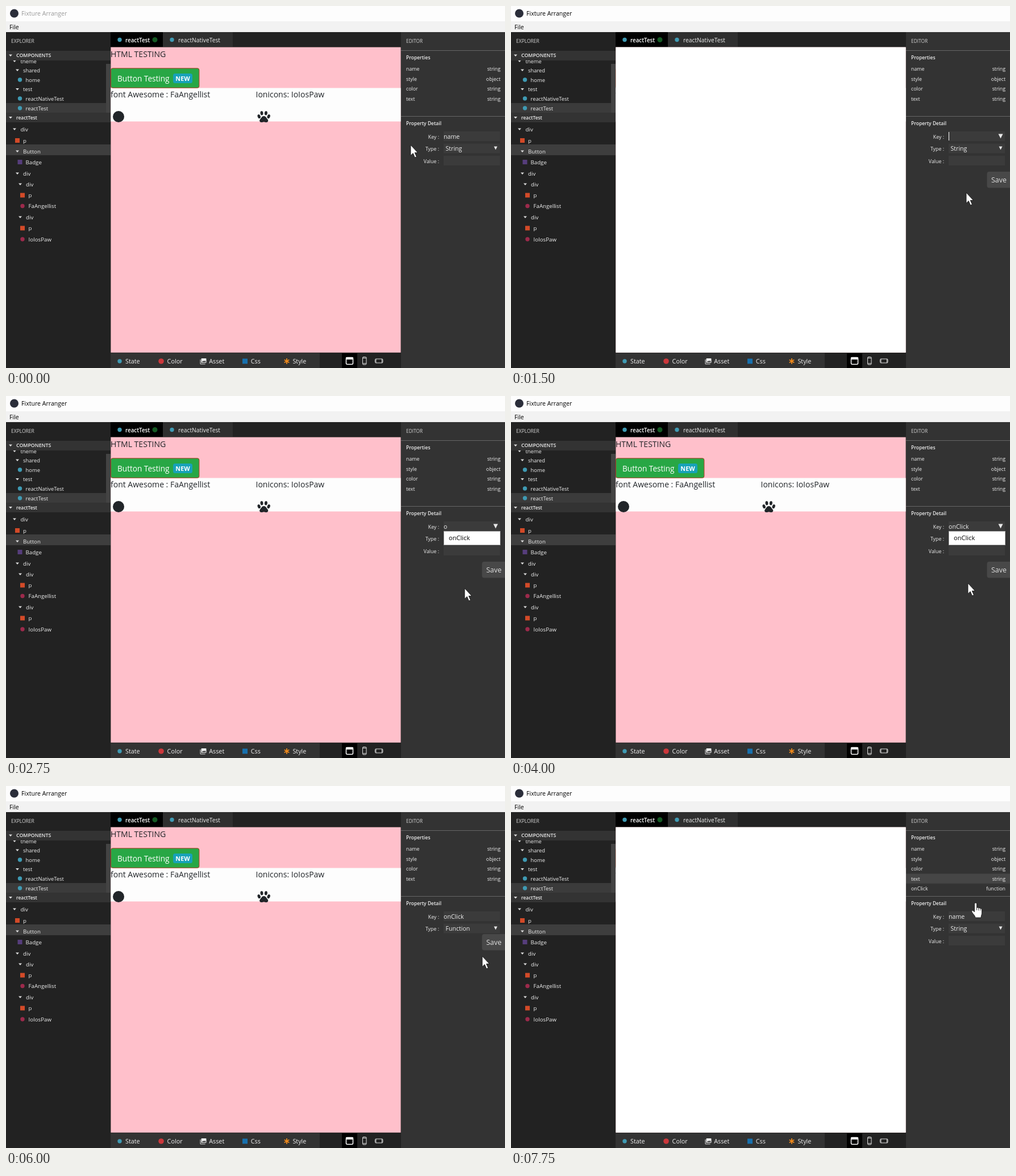
Recreate the animation shown at these times as an HTML page. Size 878 by 638 pixels, loop 8000 ms.

```html
<!DOCTYPE html>
<html lang="en">
<head>
<meta charset="utf-8">
<title>Component editor</title>
<style>
  html, body { margin: 0; width: 100%; height: 100%; overflow: hidden; background: #222; }
  svg { display: block; width: 878px; height: 638px; font-family: "Open Sans", "Noto Sans", sans-serif; }
  text { white-space: pre; }
  .anim { animation: 8s step-end infinite; }

  #title { animation-name: focus; }
  #flash { animation-name: flash; }
  #keyName { animation-name: key-name; }
  #caret { animation-name: caret; }
  #keyArrow { animation-name: key-arrow; }
  #typed1 { animation-name: typed1; }
  #typed2 { animation-name: typed2; }
  #typed3 { animation-name: typed3; }
  #list { animation-name: list; }
  #asString { animation-name: as-string; }
  #asFunction { animation-name: as-function; }
  #save { animation-name: save; }
  #newRow { animation-name: new-row; }
  #hover { animation-name: hover; }
  #pointer { animation-name: pointer; }
  #arrow { animation-name: arrow; }
  #hand { animation-name: hand; }

  @keyframes focus { 0% { fill: #999 } 3.125%, 100% { fill: #000 } }
  @keyframes flash {
    0%, 21.875%, 84.375% { opacity: 0 }
    18.75%, 81.25%, 96.875%, 100% { opacity: 1 }
  }
  @keyframes key-name { 0%, 96.875%, 100% { opacity: 1 } 18.75% { opacity: 0 } }
  @keyframes caret { 0%, 34.375%, 100% { opacity: 0 } 18.75% { opacity: 1 } }
  @keyframes key-arrow { 0%, 59.375%, 100% { opacity: 0 } 18.75% { opacity: 1 } }
  @keyframes typed1 { 0%, 37.5%, 100% { opacity: 0 } 34.375% { opacity: 1 } }
  @keyframes typed2 { 0%, 43.75%, 100% { opacity: 0 } 37.5% { opacity: 1 } }
  @keyframes typed3 { 0%, 81.25%, 100% { opacity: 0 } 43.75% { opacity: 1 } }
  @keyframes list { 0%, 56.25%, 100% { opacity: 0 } 34.375% { opacity: 1 } }
  @keyframes as-string { 0%, 81.25%, 100% { opacity: 1 } 68.75% { opacity: 0 } }
  @keyframes as-function { 0%, 81.25%, 100% { opacity: 0 } 68.75% { opacity: 1 } }
  @keyframes save {
    0%, 81.25%, 100% { opacity: 0; transform: none }
    18.75% { opacity: 1; transform: none }
    68.75% { opacity: 1; transform: translateY(-31px) }
  }
  @keyframes new-row { 0% { opacity: 0 } 81.25%, 100% { opacity: 1 } }
  @keyframes hover {
    0% { opacity: 0; transform: none }
    87.5%, 96.875%, 100% { opacity: 1; transform: translateY(52.5px) }
    90.625% { opacity: 1; transform: translateY(17.5px) }
    93.75% { opacity: 1; transform: none }
  }
  @keyframes arrow { 0% { opacity: 1 } 87.5%, 100% { opacity: 0 } }
  @keyframes hand { 0% { opacity: 0 } 87.5%, 100% { opacity: 1 } }
  @keyframes pointer {
    0% { transform: translate(712px, 245px) }
    3.125% { transform: translate(720px, 244px) }
    6.25% { transform: translate(760px, 238px) }
    9.375% { transform: translate(805px, 231px) }
    12.5% { transform: translate(830px, 226px) }
    15.625% { transform: translate(833px, 228px) }
    18.75% { transform: translate(801px, 329px) }
    21.875% { transform: translate(805px, 335px) }
    25% { transform: translate(807px, 339px) }
    50% { transform: translate(804px, 330px) }
    53.125% { transform: translate(806px, 268px) }
    56.25% { transform: translate(815px, 249px) }
    59.375% { transform: translate(845px, 247px) }
    62.5% { transform: translate(861px, 249px) }
    65.625% { transform: translate(842px, 290px) }
    68.75% { transform: translate(816px, 337px) }
    71.875% { transform: translate(824px, 322px) }
    75% { transform: translate(838px, 300px) }
    78.125% { transform: translate(851px, 276px) }
    84.375% { transform: translate(845px, 240px) }
    87.5% { transform: translate(832px, 168px) }
    90.625% { transform: translate(818px, 127px) }
    93.75% { transform: translate(815px, 110px) }
    96.875%, 100% { transform: translate(818px, 206px) }
  }
</style>
</head>
<body>
<svg id="stage" viewBox="0 0 878 638"></svg>
<script>
const light = '#efefef', ink = '#212529', panel = '#333';
const blue = '#3f9ab3', orange = '#d24a28', crimson = '#9c2a4b', purple = '#563d7c';

const rect = (x, y, w, h, fill, more = '') =>
  `<rect x="${x}" y="${y}" width="${w}" height="${h}" fill="${fill}" ${more}/>`;
const text = (x, y, str, size, fill = light, more = '') =>
  `<text x="${x}" y="${y}" font-size="${size}" fill="${fill}" ${more}>${str}</text>`;
const dot = (x, y, fill, r = 3.7) => `<circle cx="${x}" cy="${y}" r="${r}" fill="${fill}"/>`;
const box = (x, y, fill, s = 8) => rect(x - s / 2, y - s / 2, s, s, fill);
const chevron = (x, y) => `<path d="M${x - 3} ${y - 1.5}h6l-3 3.5z" fill="#ddd"/>`;
const dropArrow = (y, s) => `<path d="M${861.5 - s / 2} ${y - s / 2}h${s}l${-s / 2} ${s}z" fill="#e8e8e8"/>`;
const anim = (id, content) => `<g id="${id}" class="anim">${content}</g>`;
const bold = 'font-weight="600"', end = 'text-anchor="end"';

const marks = {
  open: chevron,
  comp: (x, y) => dot(x, y, blue),
  html: (x, y) => box(x, y, orange),
  badge: (x, y) => box(x, y, purple),
  icon: (x, y) => dot(x, y, crimson)
};
const treeItem = size => ([mark, x, y, label, labelX]) =>
  marks[mark](x, y) + text(labelX, y + 3.5, label, size);

const titleBar = () =>
  rect(0, 0, 878, 27, '#fdfdfd') + rect(0, 27, 878, 19, '#f2f2f2') +
  dot(14.5, 13, '#2b2e3a', 7.5) +
  '<text id="title" class="anim" x="27" y="17" font-size="10.6">Fixture Arranger</text>' +
  text(6, 40.5, 'File', 10.6, '#000');

const explorer = () =>
  rect(0, 46, 184, 592, '#222') + text(9, 65.3, 'EXPLORER', 8.5, '#d6d6d6') +
  rect(0, 171, 184, 17, '#3b3b3b') + rect(176, 102, 8, 86, '#434343') +
  [
    ['open', 15, 97, 'theme', 25.5],
    ['open', 20, 113, 'shared', 30],
    ['comp', 24.5, 130, 'home', 34.5],
    ['open', 20, 146.5, 'test', 30],
    ['comp', 24.5, 163, 'reactNativeTest', 34.5],
    ['comp', 24.5, 180, 'reactTest', 34.5]
  ].map(treeItem(9.4)).join('') +
  rect(0, 79, 184, 17, panel) + chevron(8, 87) + text(18, 90.2, 'COMPONENTS', 8.8, light, bold) +
  rect(0, 188, 184, 17, panel) + chevron(8, 196.5) + text(18, 200, 'reactTest', 8.4, light, bold) +
  rect(0, 244, 184, 19, '#3e3e3e') +
  [
    ['open', 15, 217, 'div', 25.5],
    ['html', 20, 237, 'p', 30],
    ['open', 20, 256, 'Button', 30],
    ['badge', 24.5, 275, 'Badge', 34.5],
    ['open', 20, 295, 'div', 30],
    ['open', 25, 314, 'div', 35],
    ['html', 29, 333.5, 'p', 39.5],
    ['icon', 29, 352.5, 'FaAngellist', 39.5],
    ['open', 25, 372, 'div', 35],
    ['html', 29, 391.5, 'p', 39.5],
    ['icon', 29, 411, 'IoIosPaw', 39.5]
  ].map(treeItem(9.7)).join('');

const tabs = () =>
  rect(184, 46, 511, 27, '#222') + rect(184, 46, 92, 26, '#000') + rect(276, 46, 123, 26, '#2f2f2f') +
  dot(200, 59.5, blue) + text(210, 63.5, 'reactTest', 9.8, '#fff', bold) + dot(262, 59.5, '#155a24', 4.5) +
  dot(292, 59.5, blue) + text(303, 63.5, 'reactNativeTest', 10.3);

const paw = () => `<g fill="${ink}">` +
  [[445.2, 194.6, -20], [450, 188.8, -6], [457.4, 188.8, 6], [462.2, 194.6, 20]].map(([x, y, a]) =>
    `<ellipse cx="${x}" cy="${y}" rx="2.5" ry="3.6" transform="rotate(${a} ${x} ${y})"/>`).join('') +
  '<path d="M453.7 194c3.5 0 4.5 3.5 6.5 5.5c2 2.3 1 5.5-2 5.5c-2 0-2.8-.8-4.5-.8s-2.5.8-4.5.8c-3 0-4-3.2-2-5.5c2-2 3-5.5 6.5-5.5z"/></g>';

const canvas = fill => rect(184.4, 72.6, 510.2, 538.2, fill);

const preview = () =>
  rect(184, 72, 511, 540, '#222') + canvas('#ffc0cb') +
  rect(184.4, 144.5, 510.2, 59, '#fdfdfd') +
  text(184, 89.5, 'HTML TESTING', 14, ink) +
  rect(184.5, 109.8, 155.4, 34.5, '#28a745', 'rx="3" stroke="#b03a22"') +
  text(196, 132.5, 'Button Testing', 13.6, '#fff', 'font-weight="500"') +
  rect(294, 119, 34, 17, '#17a2b8', 'rx="3.5"') +
  text(311, 131.7, 'NEW', 10.8, '#fff', 'font-weight="700" text-anchor="middle"') +
  text(184, 161.3, 'font Awesome : FaAngellist', 14, ink) +
  text(439.5, 161.3, 'Ionicons: IoIosPaw', 14, ink) +
  dot(198, 195, ink, 10) + paw() +
  anim('flash', canvas('#fff'));

const toolbar = () =>
  rect(184, 611, 511, 27, '#222') + rect(184, 611.5, 368, 26.5, panel) + rect(591, 612, 27, 26, '#000') +
  dot(200, 626, blue) + dot(273, 626, '#cc383c', 4.8) +
  rect(343.5, 621, 9, 8, '#eee', 'rx="1"') + '<path d="M342 623v8h8.5" fill="none" stroke="#ddd"/>' +
  '<path d="M344.5 628l2.5-3 1.5 1.5 1.5-2 2 3.5z" fill="#444"/>' +
  box(420.5, 626, '#1870ad', 9) +
  '<path d="M494 621v10M489.7 623.5l8.6 5M498.3 623.5l-8.6 5" stroke="#f08a1c" stroke-width="1.8"/>' +
  ['State', 'Color', 'Asset', 'Css', 'Style'].map((s, i) => text(210 + i * 73.6, 630, s, 10.8)).join('') +
  rect(598.5, 619.5, 12, 12, 'none', 'rx="2" stroke="#fff" stroke-width="1.5"') + rect(598, 619, 13, 4, '#fff', 'rx="1"') +
  rect(627.5, 618.5, 6.5, 13.5, 'none', 'rx="1.5" stroke="#ddd"') +
  '<path d="M627.5 620.5h6.5M627.5 630h6.5" stroke="#ddd"/>' +
  rect(649.5, 622, 13.5, 7, 'none', 'rx="1.5" stroke="#ddd"') +
  '<path d="M651 622v7M661.5 622v7" stroke="#ddd"/>';

const property = (name, type, i) =>
  text(704, 114.3 + i * 17.5, name, 8.8) + text(870, 114.3 + i * 17.5, type, 8.8, light, end);
const field = (label, y) =>
  text(762, y + 12.5, label + ' :', 8.8, light, end) + rect(770, y, 99, 17, '#3b3b3b');
const value = (str, y, x = 770) => text(x, y, str, 10.6);

const editor = () =>
  rect(695, 46, 183, 592, panel) + text(704, 65.3, 'EDITOR', 8.4, '#d6d6d6') +
  rect(695, 78, 183, 1, '#666') + rect(695, 194, 183, 1, '#666') +
  text(704, 94, 'Properties', 8.5, light, bold) + text(704, 210, 'Property Detail', 8.5, light, bold) +
  anim('hover', rect(695, 102, 183, 17.5, '#464646')) +
  [['name', 'string'], ['style', 'object'], ['color', 'string'], ['text', 'string']]
    .map(([name, type], i) => property(name, type, i)).join('') +
  anim('newRow', property('onClick', 'function', 4)) +
  field('Key', 221) + field('Type', 242.5) + dropArrow(250.5, 6) +
  anim('keyName', value('name', 234)) +
  anim('caret', rect(770, 222, 1, 15, '#fff')) +
  anim('keyArrow', dropArrow(229.5, 8)) +
  ['o', 'onC', 'onClick'].map((s, i) => anim('typed' + (i + 1), value(s, 234))).join('') +
  anim('asString', value('String', 255, 773.5) + field('Value', 264)) +
  anim('asFunction', value('Function', 255, 773.5)) +
  anim('save', rect(837.5, 292, 50, 28.5, '#484848', 'rx="4"') + text(845, 311, 'Save', 12.4, '#e0e0e0')) +
  anim('list', rect(770.5, 238.5, 99, 24, '#fff', 'stroke="#aaa"') + text(779, 254, 'onClick', 11.1, '#000'));

const pointer = () => anim('pointer',
  '<g fill="#fff" stroke="#111" stroke-width=".8" stroke-linejoin="round">' +
  anim('arrow', '<path d="M0 0v18.5l4.2-4 3.2 7.5 3-1.3-3.2-7.2h5.3z"/>') +
  anim('hand', '<path d="M-2.5 2c0-2.7 4-2.7 4 0v7c1-1.3 3-1 3.3.5c1-1 2.8-.6 3.2.8c1-.6 2.5 0 2.5 1.7v6c0 3-1.5 4-1.5 8h-10c-.5-4-3-5-5.5-9c-2-3 .5-4.5 2.5-2.5l1.5 1.5z"/>' +
    '<path d="M1.5 9v4M4.8 9.5v4M8 10.5v3" fill="none"/>') +
  '</g>');

document.getElementById('stage').innerHTML =
  [titleBar, explorer, tabs, preview, toolbar, editor, pointer].map(draw => draw()).join('');
</script>
</body>
</html>
```
